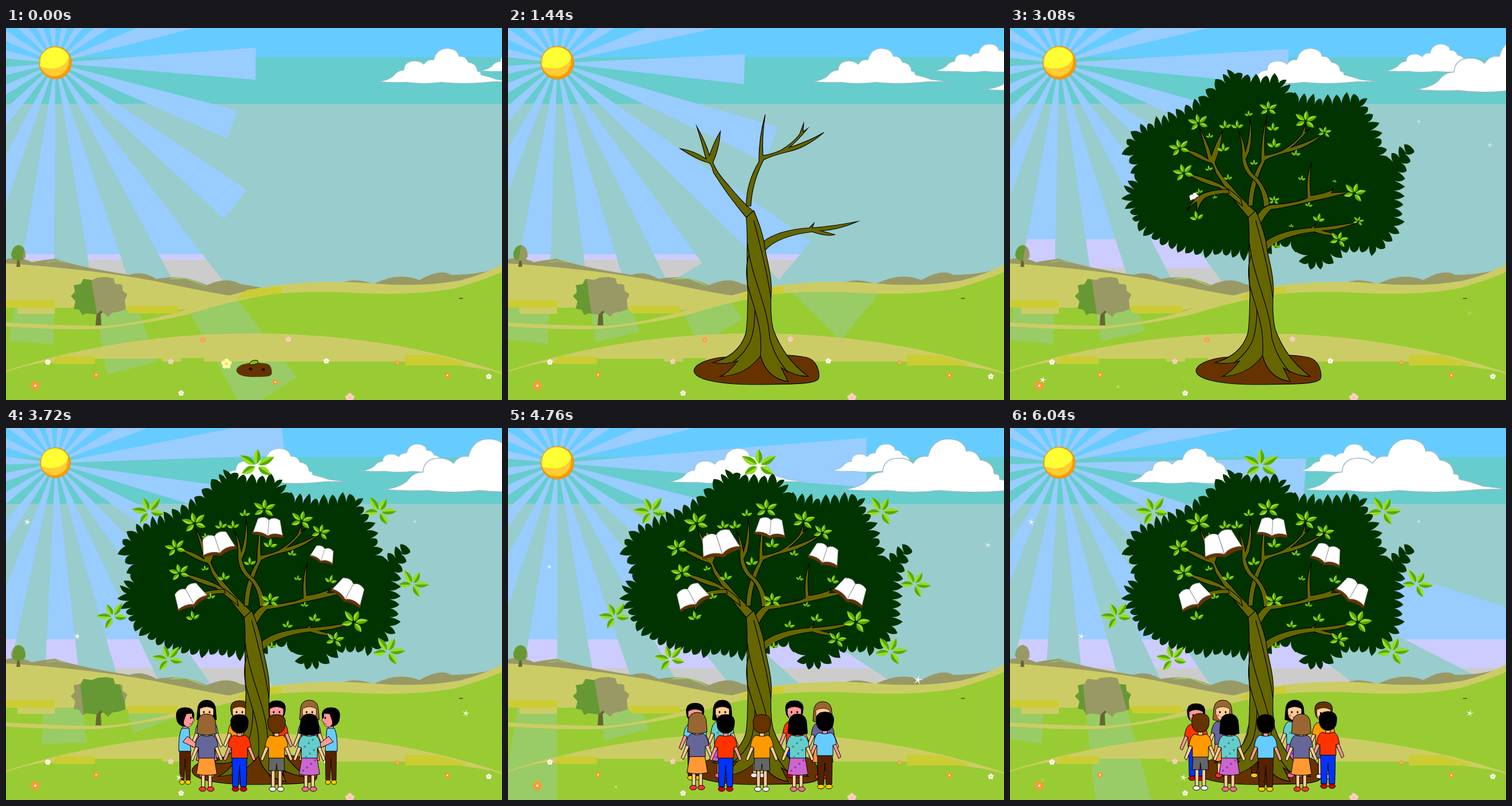
An HTML page with a canvas that plays this animation: 864x648 px, repeating every 8000 ms.

```html
<!DOCTYPE html>
<html>
<head>
<meta charset="utf-8">
<style>
html, body { margin: 0; width: 100%; height: 100%; overflow: hidden; }
canvas { display: block; }
</style>
</head>
<body>
<canvas id="stage" width="864" height="648"></canvas>
<script>
const c = document.getElementById('stage').getContext('2d');
const P = s => new Path2D(s), TAU = Math.PI * 2;
const LOOP = 8000, STEP = 40, END = 6040;

const clamp = (v, a = 0, b = 1) => Math.min(b, Math.max(a, v));
const grow = (t, a, b) => { const k = clamp((t - a) / (b - a)); return k * (2 - k); };
const triples = s => s.split(' ').map(p => p.split(',').map(Number));
function keys(t, times, vals) {
  let i = 1;
  while (i < times.length - 1 && t > times[i]) i++;
  return vals[i - 1] + (vals[i] - vals[i - 1]) * (t - times[i - 1]) / (times[i] - times[i - 1]);
}
function fill(path, color) { c.fillStyle = color; c.fill(path); }
function ink(path, color, width = 1) {
  fill(path, color);
  c.strokeStyle = '#000';
  c.lineWidth = width;
  c.stroke(path);
}
function dot(x, y, rx, ry = rx) {
  const p = new Path2D();
  p.ellipse(x, y, rx, ry, 0, 0, TAU);
  return p;
}
function at(x, y, sx, sy, angle, draw) {
  if (!sx) return;
  c.save();
  c.translate(x, y);
  c.rotate(angle);
  c.scale(sx, sy);
  draw();
  c.restore();
}
// Scale a drawing made in stage coordinates about one fixed point.
const from = (x, y, sx, sy, draw) => at(x, y, sx, sy, 0, () => { c.translate(-x, -y); draw(); });

// Landscape
const mountains = P('M0 403Q22 396 45 408Q65 404 85 402Q130 417 215 430Q237 422 262 437Q310 428 350 448Q384 432 408 446L450 453Q560 450 585 444Q608 434 640 446Q683 424 720 439Q757 418 775 430Q830 430 864 415V500H0Z');
const farTan = P('M0 410Q150 420 260 441Q350 460 390 466L420 520H0Z');
const farGreen = P('M0 487H20V498H85V487H210Q270 498 330 487Q280 512 165 519Q90 518 0 513Z');
const midTan = P('M0 513Q90 520 165 520Q250 512 320 488Q390 464 440 453Q540 436 640 445Q720 452 790 440Q830 430 864 412V648H0Z');
const midGreen = P('M0 520Q90 526 165 524Q260 513 320 498Q400 473 470 463Q540 457 620 462Q710 466 780 454Q830 440 864 425V648H0Z');
const nearTan = P('M0 597Q200 532 430 532Q660 532 864 600V648H0Z');
const nearGreen = P('M0 599Q70 576 88 585H155V576H272V581H305V575H345V581H695V588H790Q850 596 864 603V648H0Z');
const strips = P('M0 474H85V487H0ZM207 484H300V497H215ZM420 456L480 450V462L400 472Z');
const nearStrips = P('M88 572H155V585H80ZM695 569L750 570L800 584V588H695Z');
const bush = P('M113 467L120 460L118 448L130 446L135 437L150 439L160 435L175 434L187 436L190 446L202 447L203 458L211 464L207 474L208 490L196 494L184 496L178 503L165 492L158 499L140 497L133 500L128 491L118 489L121 476Z');
const cloud = P('M0 58Q18 56 27 48Q34 38 45 38Q46 22 64 22Q74 22 80 28Q86 18 97 20Q102 0 121 0Q139 1 141 14Q152 12 157 24Q172 26 173 40Q180 40 179 46Q196 50 206 54L238 58Q205 57 190 59Q150 63 110 59Q80 63 50 59Q30 60 0 58Z');
const flowers = [[343,543,5,'#f96'], [492,542,5,'#fcc'], [73,582,5,'#fff'], [287,581,5,'#fcc'], [384,585,9,'#ff9'],
  [558,580,5,'#fff'], [682,583,4,'#f93'], [157,604,5,'#f93'], [51,623,8,'#f93'], [305,636,5,'#fff'],
  [469,617,5,'#f93'], [599,644,8,'#fcc'], [769,605,5,'#f93'], [841,607,5,'#fff']];
const cloudTimes = [0, 1.44, 2.4, 3.72, 4.76, 5.44, 6.04];

const RAYS = 19, GAP = 360 / RAYS;
const skyReach = [350, 327, 400, 540, 430];
const landReach = { 3: 690, 4: 550, 8: 650 };
function rays(t, reach) {
  const p = new Path2D(), rad = Math.PI / 180;
  for (let k = 0; k < RAYS; k++) {
    const a = 0.2 - 12 * t + GAP * k, r = reach(k);
    p.moveTo(86, 61);
    for (const side of [-4.6, 4.6]) p.lineTo(86 + r * Math.cos((a + side) * rad), 61 + r * Math.sin((a + side) * rad));
    p.closePath();
  }
  return p;
}
function lit(path, light, color) {
  c.save();
  c.clip(path);
  fill(light, color);
  c.restore();
}
function sky(t) {
  [['#6cf', 0], ['#6cc', 51], ['#9cc', 132]].forEach(([color, y]) => {
    c.fillStyle = color;
    c.fillRect(0, y, 864, 648);
  });
  const [lilac, gray] = t < 3 ? [394, 404] : [368, 418], g = c.createLinearGradient(0, 0, 0, 500);
  [[0, '#9cf'], [lilac, '#9cf'], [lilac, '#ccf'], [gray, '#ccf'], [gray, '#ccc']].forEach(([y, color]) => g.addColorStop(y / 500, color));
  fill(rays(t, k => skyReach[k] || 900), g);

  const r = 27.3 + 1.4 * Math.cos((t - 1.44) / 1.66 * TAU);
  at(86, 60.5, r / 27, r / 27, 0, () => {
    fill(dot(0, 0, 27), '#f90');
    fill(dot(-2, -2, 24.5), '#fc3');
    fill(P('M-24 -6C-22 -30 18 -32 23 -8C14 10 -4 13 -25 6Z'), '#ff3');
    c.strokeStyle = '#c93';
    c.stroke(dot(0, 0, 27));
  });

  const puff = (xs, y, s) => at(keys(t, cloudTimes, xs), y, s, s, 0, () => {
    fill(cloud, '#fff');
    c.strokeStyle = '#9bc';
    c.lineWidth = 1;
    c.stroke(cloud);
  });
  puff([648, 530, 453, 355, 280, 231, 203], 35.5, 1);
  puff([825, 742, 690, 620, 562, 529, 503], 28, 0.8);
  puff([940, 830, 755, 658, 584, 535, 510], 19, 1.52);
}
function land(t) {
  const light = rays(t, k => landReach[k] || 490);
  const field = path => { fill(path, '#9c3'); lit(path, light, '#9c6'); };
  fill(mountains, '#996');
  fill(P('M68 409Q87 401 106 410L88 406ZM283 438Q312 427 350 451L314 437Z'), '#9c6');
  fill(farTan, '#cc6');
  field(farGreen);
  fill(midTan, '#cc6');
  field(midGreen);
  fill(strips, '#cc3');
  fill(P('M789 470H796V472H789Z'), '#663');
  fill(nearTan, '#cc6');
  field(nearGreen);
  fill(nearStrips, '#cc3');

  fill(P('M20 402H23L25 416H18ZM158 494L141 482L160 491L162 475L164 491L183 483L165 498L166 518H156Z'), '#663');
  const small = P('M9 395Q11 380 22 378Q33 380 34 395Q34 405 22 405Q10 405 9 395Z');
  for (const p of [bush, small]) {
    fill(p, '#693');
    lit(p, light, '#996');
  }
  for (const [x, y, r, color] of flowers) {
    for (let i = 0; i < 5; i++) fill(dot(x + r * 0.6 * Math.sin(i * TAU / 5), y - r * 0.6 * Math.cos(i * TAU / 5), r * 0.42), color);
    fill(dot(x, y, r * 0.25), color === '#f93' ? '#fff' : '#fc6');
  }
}

// Tree
const mound = P('M324 597C325 585 350 575 380 573C420 565 500 570 515 573C540 575 545 605 540 612C530 622 480 620 430 621C380 621 325 615 324 597Z');
const trunk = P('M415 330C419 370 414 410 418 460C417 490 418 515 414 533Q402 570 357 583Q380 587 400 580Q385 600 370 607Q415 605 440 571Q450 610 488 616L476 592Q500 607 523 607Q480 575 462 525Q457 505 458 470C462 430 448 400 446 372Q440 345 428 318Z');
const bark = P('M417 375C425 440 452 480 456 540Q465 575 488 600M418 450C432 500 443 520 440 571M430 490C430 540 420 560 392 582M428 335C440 380 452 430 458 470M420 395Q412 420 418 450');
const branches = [
  [422, 322, 0.75, 'M415 330Q385 295 358 252Q355 238 350 235Q330 230 300 210Q325 214 345 228Q338 200 329 172Q345 200 351 222Q358 200 370 180Q368 210 357 234Q362 250 385 275Q405 300 430 322L428 345Z'],
  [419, 310, 0.8, 'M415 310Q415 270 437 233Q437 190 448 151Q442 190 444 222Q460 220 475 213Q497 200 508 185L515 166L514 181L522 175Q506 195 490 208Q525 197 550 182Q520 208 490 215Q460 222 445 230Q425 270 423 310Z'],
  [446, 380, 0.85, 'M445 372Q470 352 525 348L533 340L530 348Q570 345 609 337Q575 352 545 353L569 360Q555 364 530 355Q470 362 447 388Z'],
  [400, 300, 1.5, 'M402 298Q375 272 340 262Q320 255 305 252Q330 270 365 278L405 310Z'],
  [381, 285, 1.6, 'M380 281Q345 282 330 292Q318 300 309 316Q320 305 325 303L326 322Q330 305 340 296Q355 288 382 288Z'],
  [446, 310, 1.55, 'M442 312Q440 280 425 265Q405 250 404 225Q405 200 398 180Q408 195 410 215Q418 190 418 158Q424 185 417 215L411 228Q415 250 432 262Q450 285 452 308Z'],
  [434, 338, 1.5, 'M430 328Q440 310 455 308Q500 305 518 296Q515 260 525 236Q521 265 524 292Q555 287 563 280L560 287L595 285Q560 295 520 303Q470 315 455 316Q445 325 435 345Z']
].map(([x, y, start, d]) => ({ x, y, start, path: P(d) }));

const leafy = triples('390,78 420,92 468,90 490,122 545,130 608,122 628,162 645,205 652,236 699,206 675,268 674,345 642,385 575,385 548,410 520,415 507,380 470,375 430,395 370,390 320,390 260,370 222,340 205,290 225,255 203,208 225,180 275,160 330,132 355,105 372,92');
const crown = (() => {
  const p = new Path2D();
  let seed = 7;
  const rnd = () => (seed = seed * 16807 % 2147483647) / 2147483647;
  p.moveTo(390, 84);
  leafy.forEach(([x, y], i) => {
    const [x2, y2] = leafy[(i + 1) % leafy.length], dx = x2 - x, dy = y2 - y, len = Math.hypot(dx, dy), n = Math.max(1, Math.round(len / 15));
    const spot = (f, out) => [x + dx * f + dy / len * out, y + dy * f - dx / len * out];
    for (let j = 0; j < n; j++) {
      const out = 5 + rnd() * 9;
      p.quadraticCurveTo(...spot((j + 0.1) / n, 4), ...spot((j + 0.3 + rnd() * 0.5) / n, out));
      p.quadraticCurveTo(...spot((j + 1) / n, 5), ...spot((j + 1) / n, -6));
    }
  });
  p.closePath();
  return p;
})();

const earlyTwigs = triples('295,208,1.1 302,251,1.1 515,160,1.2 600,286,1.2 573,368,1 375,173,.8 396,173,.8 458,177,.8 460,206,.9 326,332,.9 537,335,.8 348,190,.5 372,213,.8 347,247,.5 330,287,.5 498,221,.6 508,264,.5 520,310,.5 463,382,.6');
const lateTwigs = triples('328,164,1.3 450,140,1.2 416,152,.7 548,181,1 380,263,.8 425,237,.8 460,300,1 357,296,.6 490,346,.7 607,336,1.4 565,268,.8');
const outerTwigs = triples('248,143,1.7 437,62,1.9 652,143,1.7 185,326,1.6 710,270,1.6 282,400,1.6 667,387,1.7');
const leaf = P('M0 -2Q-7 -8 0 -17Q7 -8 0 -2Z'), leafShade = P('M0 -2Q7 -8 0 -17Z');
function twigs(list, t, start) {
  list.forEach(([x, y, s], i) => {
    const k = s * grow(t, start + i * 0.012, start + 0.3 + i * 0.012), n = s > 0.95 ? 5 : 3;
    const sway = 0.05 * Math.sin(t * 5 + i);
    at(x, y, k, k, sway + (x - 435) / 500, () => {
      for (let j = 0; j < n; j++) {
        at(0, 2, 0.9, 0.9 + (j % 2) * 0.15, (j - (n - 1) / 2) * 1.05, () => { fill(leaf, '#9d2'); fill(leafShade, '#5a0'); });
      }
    });
  });
}

// x, y, scale, tilt, start
const books = [[320, 294, 1, -0.5, 3.0], [457, 174, 0.92, 0.06, 3.1], [598, 285, 1, 0.52, 3.1], [368, 203, 1.18, -0.33, 3.4], [552, 221, 0.93, 0.3, 3.45]];
function book() {
  fill(P('M-29 8L-30 14Q-12 13 0 20Q14 14 30 17L29 10Z'), '#630');
  const pages = P('M-21 -16Q-8 -23 0 -15Q8 -23 21 -16L28 12Q11 7 0 15Q-12 7 -28 10Z');
  fill(pages, '#fff');
  c.strokeStyle = '#666';
  c.lineWidth = 0.8;
  c.stroke(pages);
  c.stroke(P('M0 -15V14'));
}

// Children: hair, long hair, skin, top, bottom colour, bottom kind, shoes
const kids = [
  ['#000', 0, '#f99', '#6cf', '#520', 'pants', '#fc0'],
  ['#963', 1, '#fc9', '#669', '#f93', 'skirt', '#f33'],
  ['#000', 0, '#f99', '#f30', '#03f', 'pants', '#c00'],
  ['#630', 0, '#fc9', '#f90', '#666', 'shorts', '#eee'],
  ['#000', 1, '#fc9', '#6cc', '#c6c', 'skirt', '#f69']];
const body = {
  pants: P('M-13 -60H13L12 -8H2L0 -45L-2 -8H-12Z'),
  shorts: P('M-13 -60H13L14 -36H1L0 -48L-1 -36H-14Z'),
  skirt: P('M-13 -60H13L18 -30Q0 -26 -18 -30Z'),
  legs: P('M-9 -40H-3V-6H-9ZM3 -40H9V-6H3Z'),
  top: P('M-10 -98Q0 -94 10 -98Q18 -95 20 -78L14 -76V-58H-14V-76L-20 -78Q-18 -95 -10 -98Z'),
  arms: P('M-19 -79L-28 -56L-24 -53L-14 -76ZM19 -79L28 -56L24 -53L14 -76Z'),
  sideTop: P('M-7 -98H6Q12 -85 11 -58H-10Z'),
  sideArm: P('M-4 -84L-28 -64L-26 -60L4 -74Z'),
  bob: P('M-16 -115Q-16 -135 0 -135Q16 -135 16 -115L17 -101Q0 -95 -17 -101Z'),
  crop: P('M-15 -116Q-18 -134 0 -134Q18 -134 15 -116Q14 -102 0 -101Q-14 -102 -15 -116Z')
};
function kid([hair, long, skin, top, lower, kind, shoe], view, x, y) {
  const side = view === 'left' || view === 'right';
  at(x, y, view === 'right' ? -1 : 1, 1, 0, () => {
    c.save();
    if (side) c.scale(0.75, 1);
    if (kind !== 'pants') ink(body.legs, skin);
    for (const s of [-7, 7]) ink(dot(s, -4, 6, 4), shoe);
    ink(body[kind], lower);
    c.restore();
    ink(P('M-4 -104H4V-94H-4Z'), skin);
    if (side) {
      ink(body.sideTop, top);
      ink(body.sideArm, skin);
    } else {
      ink(body.arms, skin);
      ink(body.top, top);
    }
    if (kind === 'skirt' && lower === '#c6c') {
      for (let i = 0; i < 10; i++) fill(dot(i * 7 % 23 - 11, -36 - i * 6, 2), i < 4 ? '#93c' : '#399');
    }
    ink(long ? body.bob : body.crop, hair);
    if (view === 'back') return;
    if (side) {
      ink(P('M-2 -123L-12 -124L-13 -116L-17 -112L-13 -109Q-13 -101 -4 -100Q5 -103 2 -112Z'), skin, 0.7);
      fill(dot(-10, -116, 1.3, 2), '#000');
    } else {
      ink(P('M-12 -120Q0 -127 12 -120Q14 -101 0 -99Q-14 -101 -12 -120Z'), skin, 0.7);
      for (const s of [-5, 5]) {
        fill(dot(s, -114, 1.4, 2), '#000');
        fill(dot(s * 1.6, -108, 2.2), '#f77');
      }
    }
    c.strokeStyle = '#600';
    c.stroke(side ? P('M-12 -106L-7 -105') : P('M-4 -106Q0 -103 4 -106'));
  });
}
function ring(t) {
  const turn = keys(t, [2.68, 3.72, 4.76, 5.44, 6.04], [-5.4, 0, 5.45, 10, 12.4]);
  return Array.from({ length: 10 }, (_, i) => {
    const p = ((turn + i) % 10 + 10) % 10, a = p * Math.PI / 5;
    const across = (Math.cos(a) + Math.abs(p - 5) * 0.4 - 1) / 2;
    const depth = clamp(2.3 * Math.sin(a), -1, 1);
    const view = depth > 0.55 ? 'back' : depth < -0.55 ? 'front' : across > 0 ? 'left' : 'right';
    return { type: kids[(10 - i) % 5], view, x: 439 + 127 * across, y: 621 + 12 * depth };
  }).sort((a, b) => a.y - b.y);
}

function tree(t) {
  const k = grow(t, 2.5, 3);
  from(430, 330, k, k, () => fill(crown, '#030'));
  twigs(outerTwigs, t, 3.1);

  const m = grow(t, 0, 0.9);
  from(432, 596, 0.28 + 0.72 * m, 0.46 + 0.54 * m, () => ink(mound, '#630', 1.2));
  if (t < 0.3) {
    for (const [x, y] of [[426, 594], [448, 595]]) ink(dot(x, y, 2.5, 1.8), '#410');
    ink(P('M424 587Q425 577 438 579Q442 585 432 586Z'), '#8b1');
  }
  const all = t > 3.1 ? ring(t) : [];
  const people = front => {
    c.globalAlpha = grow(t, 3.1, 3.4);
    all.filter(p => (p.y > 617) === front).forEach(p => kid(p.type, p.view, p.x, p.y));
    c.globalAlpha = 1;
  };
  people(false);

  const h = grow(t, 0.1, 1.1);
  from(435, 598, h, h, () => {
    for (const b of branches) {
      const g = grow(t, b.start, b.start + 0.55);
      from(b.x, b.y, g, g, () => ink(b.path, '#660', 1.2));
    }
    ink(trunk, '#660', 1.2);
    c.stroke(bark);
  });
  twigs(earlyTwigs, t, 1.85);
  twigs(lateTwigs, t, 2.9);
  for (const [x, y, s, tilt, start] of books) {
    const g = s * grow(t, start, start + 0.5);
    at(x, y, g, g, tilt + 0.02 * Math.sin(t * 6 + x), book);
  }
  people(true);
}

// x, y, size, moment of full brightness
const stars = [[37, 164, 7, 3.7], [124, 363, 7, 3.65], [836, 204, 7, 5.1], [72, 242, 5, 4.7], [801, 497, 7, 3.6],
  [714, 439, 9, 4.7], [302, 609, 7, 3.65], [57, 613, 7, 5.5], [188, 625, 4, 5.1], [712, 163, 4, 3.4]];
function twinkle(t) {
  if (t < 2.56) return;
  for (const [x, y, r, peak] of stars) {
    const glow = Math.cos((t - peak) / 2.4 * TAU);
    if (glow <= 0) continue;
    c.globalAlpha = glow;
    const p = new Path2D();
    for (let i = 0; i < 10; i++) {
      const a = i * TAU / 10 + 0.2, d = i % 2 ? r * 0.22 : r;
      p.lineTo(x + d * Math.sin(a), y - d * Math.cos(a));
    }
    fill(p, '#fff');
  }
  c.globalAlpha = 1;
}

function frame(now) {
  const t = Math.min(END, Math.floor(now % LOOP / STEP) * STEP) / 1000;
  sky(t);
  land(t);
  tree(t);
  twinkle(t);
  requestAnimationFrame(frame);
}
frame(0);
</script>
</body>
</html>
```
